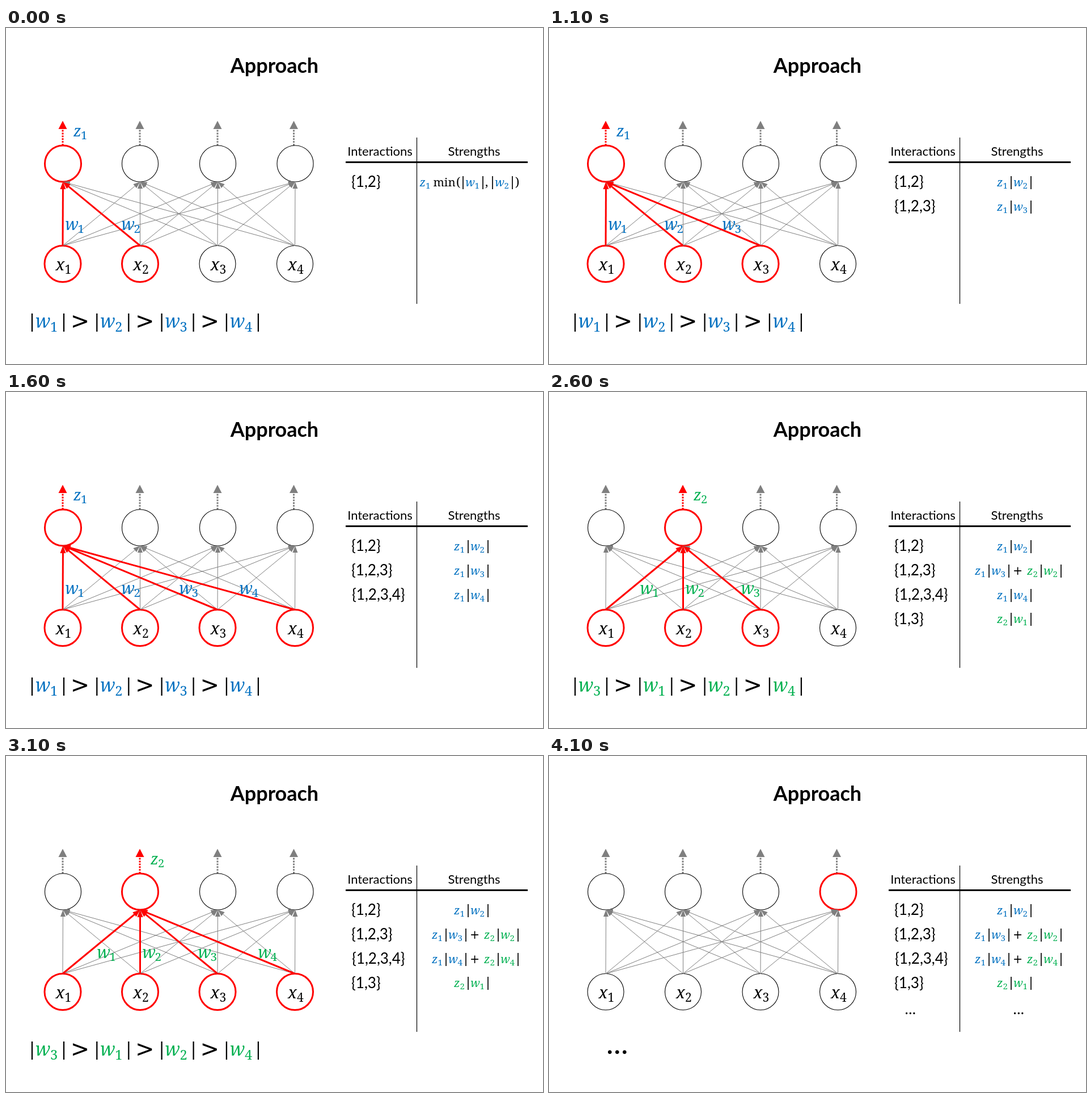
An HTML page for the animation above (4.6 s loop, 947 by 592 pixels).

```html
<!DOCTYPE html>
<html lang="en">
<head>
<meta charset="utf-8">
<title>Approach</title>
<style>
  html, body { margin: 0; width: 100%; height: 100%; overflow: hidden; background: #fff; }
  svg { display: block; width: 947px; height: 592px; }
  text { font-family: Lato, "Open Sans", sans-serif; }
  .var { font-family: "Noto Serif", "Liberation Serif", serif; font-style: italic; }
  .num { font-family: "Noto Serif", "Liberation Serif", serif; }
  .op { font-family: "DejaVu Sans", sans-serif; }
</style>
</head>
<body>
<svg id="stage" viewBox="0 0 947 592"></svg>
<script>
const RED = '#ff0000', GREY = '#7f7f7f', BLACK = '#000', BLUE = '#0070c0', GREEN = '#00b050';
const topX = [100.5, 236.5, 373.5, 510], lowX = [100, 236.5, 373, 509.5], outX = [100, 236, 373, 507.5];
const TOP_Y = 239, LOW_Y = 415.5, R = 32;

// One entry per scene: active unit, active inputs, number of table rows, rows holding a sum
const scenes = [
  { unit: 0, ins: [0, 1], rows: 1, min: true },
  { unit: 0, ins: [0, 1], rows: 1 },
  { unit: 0, ins: [0, 1, 2], rows: 2 },
  { unit: 0, ins: [0, 1, 2, 3], rows: 3 },
  { unit: 1, ins: [0, 2], rows: 4 },
  { unit: 1, ins: [0, 1, 2], rows: 4, sums: 1 },
  { unit: 1, ins: [0, 1, 2, 3], rows: 4, sums: 2 },
  { unit: 2, ins: [], rows: 5, sums: 2 },
  { unit: 3, ins: [], rows: 5, sums: 2 }
];
const units = [
  { color: BLUE, zx: 119, wx: [105, 204, 306, 412], order: [1, 2, 3, 4] },
  { color: GREEN, zx: 255, wx: [161, 241, 339, 445], order: [3, 1, 2, 4] }
];
const sets = ['{1,2}', '{1,2,3}', '{1,2,3,4}', '{1,3}'];

const text = (s, x, y, size, fill = BLACK, attrs = '') =>
  `<text x="${x}" y="${y}" font-size="${size}" fill="${fill}" ${attrs}>${s}</text>`;
const line = (x1, y1, x2, y2, color, width, attrs = '') =>
  `<line x1="${x1}" y1="${y1}" x2="${x2}" y2="${y2}" stroke="${color}" stroke-width="${width}" ${attrs}/>`;
const bar = (x, y, h, width) => line(x, y, x, y + h, BLACK, width);
const ring = (x, y, hot) =>
  `<circle cx="${x}" cy="${y}" r="${R}" fill="#fff" stroke="${hot ? RED : BLACK}" stroke-width="${hot ? 3 : 1.1}"/>`;

// Variable with a subscript
const sym = (v, n, x, y, size, gap, drop, sub, color) =>
  text(v, x, y, size, color, 'class="var"') + text(n, x + gap, y + drop, sub, color, 'class="num"');

function edge(from, to, hot) {
  const x1 = lowX[from], y1 = 383.5, x2 = topX[to], y2 = 271;
  const d = Math.hypot(x2 - x1, y2 - y1), ux = (x2 - x1) / d, uy = (y2 - y1) / d;
  const len = hot ? 13 : 12, half = hot ? 5 : 4.5, color = hot ? RED : GREY;
  const bx = x2 - ux * len, by = y2 - uy * len;
  return line(x1, y1, bx, by, color, hot ? 3 : 1) +
    `<path d="M${x2} ${y2}L${bx - uy * half} ${by + ux * half}L${bx + uy * half} ${by - ux * half}Z" fill="${color}"/>`;
}

function output(i, hot) {
  const x = outX[i], color = hot ? RED : GREY;
  return line(x, 207, x, 177, color, 3, 'stroke-dasharray="2.9 2"') +
    `<path d="M${x} 163.5L${x + 7.5} 178H${x - 7.5}Z" fill="${color}"/>`;
}

const cellZ = (n, x, y, color) => sym('z', n, x, y, 20.5, 10.5, 4, 15, color);
const cellW = (n, x, y, color) =>
  bar(x, y - 18, 23, 1.7) + sym('w', n, x + 4, y, 20.5, 16.5, 4, 15, color) + bar(x + 35, y - 18, 23, 1.7);
const term = (z, w, x, y) => {
  const color = units[z - 1].color;
  return cellZ(z, x, y, color) + cellW(w, x + 25, y, color);
};

function minCell(y) {
  const serif = 'class="num"';
  return cellZ(1, 729.5, y, BLUE) + text('min', 753.5, y, 20.5, BLACK, serif) + text('(', 794, y, 21, BLACK, serif) +
    cellW(1, 806, y, BLUE) + text(',', 845, y, 21, BLACK, serif) + cellW(2, 858, y, BLUE) +
    text(')', 898, y, 21, BLACK, serif);
}

function table({ rows, sums = 0, min }) {
  let s = text('Interactions', 659.5, 225, 22, BLACK, 'text-anchor="middle"') +
    text('Strengths', 825.5, 225, 22, BLACK, 'text-anchor="middle"') +
    line(724.5, 193, 724.5, 486, BLACK, 1.2) + line(599, 236.5, 920, 236.5, BLACK, 3);
  for (let i = 0; i < Math.min(rows, 4); i++) {
    const y = 279 + 43 * i;
    s += text(sets[i], i === 2 ? 610 : 609, y + 1, 26);
    if (min) s += minCell(y);
    else if (i === 3) s += term(2, 1, 790, y - 1);
    else if (i > 0 && i <= sums) {
      s += term(1, i + 2, 751, y) + text('+', 818, y, 20.5, BLACK, 'class="op"') + term(2, i * 2, 843, y);
    } else s += term(1, i + 2, 790, y);
  }
  if (rows === 5) {
    for (const x of [637.5, 828.5])
      s += text('...', x, 455, 26, BLACK, 'text-anchor="middle" letter-spacing=".6"');
  }
  return s;
}

function ranking(unit) {
  if (!unit) return text('...', 102, 525, 44, BLACK, 'font-weight="700" letter-spacing="2.5"');
  return unit.order.map((n, i) => {
    const x = 46 + 114.3 * i;
    return bar(x, 503, 32, 2.3) + sym('w', n, x + 5.5, 528, 32.5, 26.5, 7, 23.5, unit.color) + bar(x + 56, 503, 32, 2.3) +
      (i < 3 ? text('&gt;', x + 67.8, 529.5, 40, BLACK, 'class="op"') : '');
  }).join('');
}

function draw(scene) {
  const unit = units[scene.unit], ids = [0, 1, 2, 3];
  const isOn = i => scene.ins.includes(i);
  let s = text('Approach', 473.5, 79, 36, BLACK, 'text-anchor="middle" font-weight="700"');
  for (const i of ids) s += output(i, unit && i === scene.unit);
  // The active unit is drawn last so its outline stays on top
  for (const i of ids) s += ring(topX[i], TOP_Y, i === scene.unit) + ring(lowX[i], LOW_Y, isOn(i));
  for (const from of ids) for (const to of ids) s += edge(from, to, false);
  for (const i of scene.ins) s += edge(i, scene.unit, true);
  for (const i of ids) s += sym('x', i + 1, lowX[i] - 12.5, 427, 29, 16, 6, 21, BLACK);
  if (unit) {
    s += sym('z', scene.unit + 1, unit.zx, 191, 27, 13, 5, 20, unit.color);
    for (const i of scene.ins) s += sym('w', i + 1, unit.wx[i] - 1, 355.5, 29, 22.5, 5, 20.5, unit.color);
  }
  stage.innerHTML = s + ranking(unit) + table(scene);
}

const stage = document.getElementById('stage');
const start = performance.now();
let shown = -1;
function tick() {
  const t = (performance.now() - start) % 4600;
  const k = t < 600 ? 0 : 1 + Math.floor((t - 600) / 500);
  if (k !== shown) draw(scenes[shown = k]);
  requestAnimationFrame(tick);
}
tick();
</script>
</body>
</html>
```
